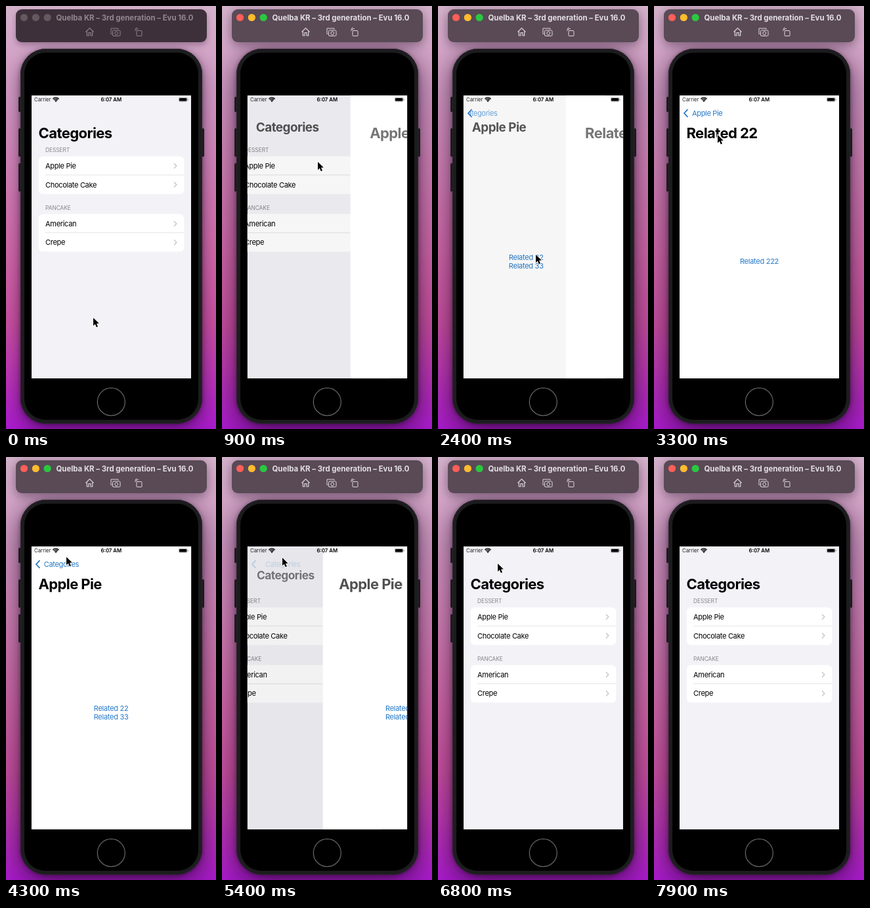
Animation of 320x643 px, one loop 8 s. Source, as an HTML page with a canvas:

```html
<!DOCTYPE html>
<html lang="en">
<head>
<meta charset="utf-8">
<title>Navigation demo</title>
<style>
  html, body { margin: 0; width: 100%; height: 100%; overflow: hidden; }
  canvas { display: block; width: 320px; height: 643px; }
</style>
</head>
<body>
<canvas id="stage" width="320" height="643"></canvas>
<script>
const ctx = document.getElementById("stage").getContext("2d");
const LOOP = 8000, STEP = 100;
const SCREEN = { x: 38.8, y: 135.7, w: 243.4, h: 430.6 };
const BLUE = "#2478c8", GROUPED = "#f2f2f7";
const PAGES = [
  { title: "Categories", bg: GROUPED, draw: drawList },
  { title: "Apple Pie", bg: "#fff", draw: () => drawLinks(["Related 22", "Related 33"]) },
  { title: "Related 22", bg: "#fff", draw: () => drawLinks(["Related 222"]) }
];
// time, x, y of the pointer tip
const POINTER = [
  [100, 133, 474], [700, 146, 237], [1100, 146, 237], [1900, 149, 378],
  [2650, 149, 378], [3300, 97, 196], [3550, 92, 152], [5300, 92, 152],
  [5800, 91, 162], [7000, 91, 162], [7600, 332, 330]
];

const clamp = v => Math.min(1, Math.max(0, v));
const mix = (a, b, u) => a + (b - a) * u;
const smooth = u => u * u * (3 - 2 * u);

function spring(t, start) {
  const s = Math.max(0, t - start) * 0.0106;
  return 1 - (1 + s) * Math.exp(-s);
}

function box(x, y, w, h, r, fill) {
  ctx.beginPath();
  ctx.roundRect(x, y, w, h, r);
  ctx.fillStyle = fill;
  ctx.fill();
}

function line(points, color, width = 1) {
  ctx.beginPath();
  points.forEach(([x, y]) => ctx.lineTo(x, y));
  ctx.strokeStyle = color;
  ctx.lineWidth = width;
  ctx.stroke();
}

function disc(x, y, r, fill) {
  ctx.beginPath();
  ctx.arc(x, y, r, 0, Math.PI * 2);
  ctx.fillStyle = fill;
  ctx.fill();
}

// y is the middle of the capital letters
function text(str, x, y, size, { weight = 400, color = "#000", align = "left", track = 0, alpha = 1 } = {}) {
  ctx.save();
  ctx.globalAlpha *= clamp(alpha);
  ctx.font = `${weight} ${size}px Inter, sans-serif`;
  ctx.letterSpacing = `${track * size}px`;
  ctx.textAlign = align;
  ctx.fillStyle = color;
  ctx.fillText(str, x, y + size * 0.36);
  ctx.restore();
}

function drawWallpaper() {
  const g = ctx.createLinearGradient(0, 0, 0, 643);
  [[0, "#d4b2cb"], [0.2, "#d19ac3"], [0.4, "#d280b6"], [0.6, "#d166a9"],
   [0.75, "#c950a2"], [0.86, "#bd39b4"], [1, "#a81acb"]].forEach(([at, c]) => g.addColorStop(at, c));
  ctx.fillStyle = g;
  ctx.fillRect(0, 0, 320, 643);
}

function shadowed(blur, alpha, dy, draw) {
  ctx.save();
  ctx.shadowColor = `rgba(20,0,25,${alpha})`;
  ctx.shadowBlur = blur;
  ctx.shadowOffsetY = dy;
  draw();
  ctx.restore();
}

function drawPhone(active) {
  const body = () => box(22, 65, 277, 570, 39, "#202022");
  shadowed(active ? 40 : 28, active ? 0.65 : 0.5, 10, body);
  shadowed(7, 0.45, 1, body);
  [[19, 138, 23], [19, 186, 43], [19, 239, 43], [298, 186, 43]]
    .forEach(([x, y, h]) => box(x, y, 4, h, 1.5, "#1b1a1d"));
  box(22, 65, 277, 570, 39, "#232325");
  box(23.5, 66.5, 274, 567, 37, "#1c1c1e");
  box(28, 71, 265, 558, 32, "#000");
  ctx.beginPath();
  ctx.arc(160.3, 601.7, 21, 0, Math.PI * 2);
  ctx.strokeStyle = "#656567";
  ctx.lineWidth = 1.3;
  ctx.stroke();
}

function drawToolbar(active) {
  shadowed(active ? 18 : 10, active ? 0.45 : 0.3, 4,
    () => box(15, 5, 291, 50, 9, active ? "#594a56" : "#3e303b"));
  const lights = active ? ["#fe5f57", "#febc2e", "#2ac840"] : Array(3).fill("#65585f");
  lights.forEach((c, i) => disc(27.5 + i * 17.8, 17.5, 5.6, c));
  text("Quelba KR – 3rd generation – Evu 16.0", 76.5, 17.5, 11.4,
    { weight: 700, color: active ? "#e5dfe4" : "#92868e" });

  const ink = active ? "#ded6dc" : "#8d818a";
  line([[121.5, 39.5], [127.5, 33.5], [133.5, 39.5]], ink, 1.2);
  line([[123.3, 38.5], [123.3, 45], [126, 45], [126, 40.5], [129, 40.5], [129, 45], [131.7, 45], [131.7, 38.5]], ink, 1.2);
  line([[161.5, 42.5], [160, 42.5], [160, 34], [171, 34], [171, 35.5]], ink);
  ctx.beginPath();
  ctx.roundRect(162.5, 37, 11.5, 8.5, 1.5);
  ctx.moveTo(170.8, 41.3);
  ctx.arc(168.2, 41.3, 2.4, 0, Math.PI * 2);
  ctx.stroke();
  ctx.beginPath();
  ctx.roundRect(199, 37.5, 8, 8, 1);
  ctx.moveTo(196.5, 38);
  ctx.quadraticCurveTo(196.5, 34.5, 202, 34.5);
  ctx.moveTo(199.5, 32.5);
  ctx.lineTo(197, 34.8);
  ctx.lineTo(199.5, 37);
  ctx.stroke();
}

function drawStatus() {
  text("Carrier", 43, 142.2, 7.8, { color: "#222" });
  text("6:07 AM", 160.3, 142.2, 7.8, { weight: 600, align: "center" });
  ctx.strokeStyle = "#000";
  ctx.lineWidth = 1.25;
  [2.6, 4.5, 6.4].forEach(r => {
    ctx.beginPath();
    ctx.arc(76, 145.6, r, -Math.PI * 0.76, -Math.PI * 0.24);
    ctx.stroke();
  });
  disc(76, 144.7, 1, "#000");
  ctx.beginPath();
  ctx.roundRect(263.2, 139.2, 13, 6, 1.8);
  ctx.strokeStyle = "#888";
  ctx.lineWidth = 0.6;
  ctx.stroke();
  box(264, 140, 11.4, 4.4, 1, "#000");
  box(277, 141.2, 0.9, 2, 0.4, "#888");
}

function drawList() {
  [["DESSERT", 219.5, "Apple Pie", "Chocolate Cake"], ["PANCAKE", 307.3, "American", "Crepe"]]
    .forEach(([head, y, ...rows]) => {
      text(head, 60, y, 8.3, { color: "#85858a" });
      box(49.5, y + 9, 222, 57.3, 6.5, "#fff");
      line([[60, y + 37.4], [271.5, y + 37.4]], "#d8d8dc", 0.7);
      rows.forEach((label, i) => {
        const rowY = y + 23.6 + i * 28.5;
        text(label, 60, rowY, 11, { track: -0.027 });
        line([[256, rowY - 4], [259.8, rowY], [256, rowY + 4]], "#bcbcc0", 1.2);
      });
    });
}

function drawLinks(labels) {
  labels.forEach((label, i) =>
    text(label, 160.5, 388.3 + (i - (labels.length - 1) / 2) * 13, 11,
      { color: BLUE, align: "center", track: -0.024 }));
}

function drawPage(page, dx) {
  ctx.save();
  ctx.translate(dx, 0);
  ctx.fillStyle = page.bg;
  ctx.fillRect(SCREEN.x, SCREEN.y, SCREEN.w, SCREEN.h);
  page.draw();
  ctx.restore();
}

function largeTitle(label, x, y, size, alpha) {
  text(label, x, y, size, { weight: 700, track: -0.026, alpha });
}

function backLabel(label, x, alpha) {
  text(label, x, 163, 11, { color: BLUE, track: -0.03, alpha });
}

function drawNav(index, f) {
  const current = PAGES[index], next = PAGES[index + 1];
  largeTitle(current.title, mix(49.5, 56, f), mix(193, 168, f), mix(22, 13, f), 1 - f * 0.95);
  if (next && f > 0) {
    largeTitle(next.title, 49.5 + 1.12 * SCREEN.w * (1 - f), 193, 22, Math.pow(f, 0.6));
    backLabel(current.title, mix(75, 58, f), (f - 0.42) / 0.5);
  }
  if (index > 0) {
    ctx.save();
    ctx.beginPath();
    ctx.rect(48, 150, 230, 26);
    ctx.clip();
    backLabel(PAGES[index - 1].title, 58 - 58 * f, 1 - f * 0.9);
    ctx.restore();
  }
  ctx.save();
  ctx.globalAlpha = index > 0 ? 1 : clamp((f - 0.4) / 0.5);
  line([[51.5, 157.2], [46, 163], [51.5, 168.8]], BLUE, 1.7);
  ctx.restore();
}

function drawScreen(t) {
  const depth = spring(t, 782) + spring(t, 2281) - spring(t, 3600) - spring(t, 5250);
  const level = Math.abs(depth - Math.round(depth)) < 0.002 ? Math.round(depth) : depth;
  const index = Math.max(0, Math.floor(level)), f = clamp(level - index);
  const { x, y, w, h } = SCREEN;
  ctx.save();
  ctx.beginPath();
  ctx.rect(x, y, w, h);
  ctx.clip();
  drawPage(PAGES[index], -0.3 * w * f);
  if (f > 0) {
    // the parallax shift uncovers nothing on the right: the next page covers it
    ctx.fillStyle = `rgba(0,0,20,${0.1 * f})`;
    ctx.fillRect(x, y, w, h);
    drawPage(PAGES[index + 1], w * (1 - f));
  }
  drawNav(index, f);
  drawStatus();
  ctx.restore();
}

function drawPointer(t) {
  const last = POINTER.length - 1;
  if (t >= POINTER[last][0]) return;
  const i = Math.max(0, POINTER.findLastIndex(k => k[0] <= t));
  const [t0, x0, y0] = POINTER[i], [t1, x1, y1] = POINTER[i + 1];
  const u = smooth(clamp((t - t0) / (t1 - t0)));
  ctx.save();
  ctx.translate(mix(x0, x1, u), mix(y0, y1, u));
  ctx.beginPath();
  [[0, 0], [0, 12.2], [2.8, 9.6], [4.8, 14.2], [7, 13.2], [5, 8.8], [8.8, 8.6]]
    .forEach(([x, y]) => ctx.lineTo(x, y));
  ctx.closePath();
  ctx.lineJoin = "round";
  ctx.strokeStyle = "#fff";
  ctx.lineWidth = 1.8;
  ctx.stroke();
  ctx.fillStyle = "#000";
  ctx.fill();
  ctx.restore();
}

function render(now) {
  const t = Math.floor((now % LOOP) / STEP) * STEP;
  const active = t >= 700;
  drawWallpaper();
  drawPhone(active);
  drawToolbar(active);
  drawScreen(t);
  drawPointer(t);
}

let start;
function frame(now) {
  start ??= now;
  render(Math.max(0, now - start));
  requestAnimationFrame(frame);
}
requestAnimationFrame(frame);
</script>
</body>
</html>
```
